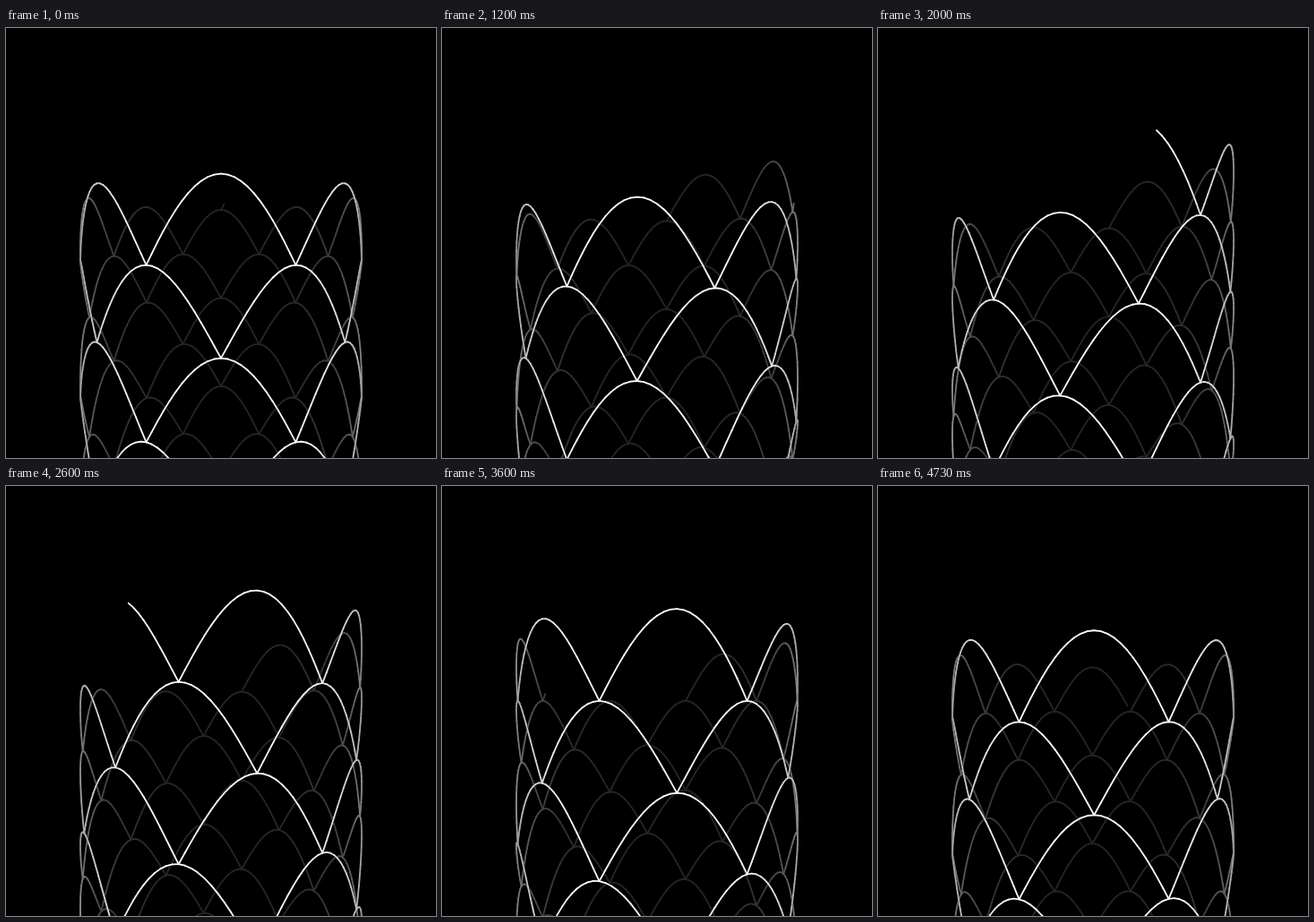
An HTML page with a canvas for the animation above (4790 ms loop, 480 by 480 pixels).

```html
<!DOCTYPE html>
<html lang="en">
<head>
<meta charset="utf-8">
<title>Woven cylinder</title>
<style>
  html, body { margin: 0; width: 100%; height: 100%; overflow: hidden; background: #000; }
  canvas { display: block; }
</style>
</head>
<body>
<canvas id="stage" width="480" height="480"></canvas>
<script>
const ctx = document.getElementById('stage').getContext('2d');
const SIZE = 480, CENTER = SIZE / 2;
const LOOP = 4790, FRAMES = 72, STEP = 200 / 3;
const CAMERA = CENTER / Math.tan(Math.PI / 6);
const RADIUS = 146.9, PITCH = 66.6, TOP = -50;
const ARCHES = 8, ARCH_STEPS = 24, RINGS = 8;
const TOTAL = ARCHES * ARCH_STEPS;
const HALF_ARCH = Math.PI / ARCHES;

// Frame starts fall on whole hundredths of a second.
const frameStart = i => Math.round(i * STEP / 10) * 10;

function frameAt(ms) {
  let i = Math.min(FRAMES - 1, Math.ceil(ms / STEP) + 1);
  while (frameStart(i) > ms) i--;
  return i;
}

function project(angle, height) {
  const scale = CAMERA / (CAMERA - RADIUS * Math.cos(angle));
  return [CENTER + RADIUS * Math.sin(angle) * scale, CENTER + height * scale];
}

function shade(angle) {
  const nearness = (1 + Math.cos(angle)) / 2;
  const gray = Math.min(255, Math.round(36 + 235 * nearness ** 2));
  return `rgb(${gray},${gray},${gray})`;
}

function drawRing(start, base, count) {
  const angleAt = i => start - 2 * Math.PI * i / TOTAL;
  const pointAt = i => project(angleAt(i),
    base - PITCH * Math.abs(Math.sin(Math.PI * i / ARCH_STEPS)));
  let from = pointAt(0);
  for (let i = 1; i <= count; i++) {
    const to = pointAt(i);
    ctx.strokeStyle = shade(angleAt(i - 0.5));
    ctx.beginPath();
    ctx.moveTo(...from);
    ctx.lineTo(...to);
    ctx.stroke();
    from = to;
  }
}

function draw(ms) {
  const frame = frameAt(ms);
  const progress = frame / FRAMES;
  const drawn = Math.min(TOTAL, Math.ceil(frame * TOTAL / FRAMES - 1e-6) + 1);

  ctx.globalCompositeOperation = 'source-over';
  ctx.fillStyle = '#000';
  ctx.fillRect(0, 0, SIZE, SIZE);

  // Lightest wins, so near strands stay unbroken over far ones.
  ctx.globalCompositeOperation = 'lighten';
  ctx.lineWidth = 1.8;
  ctx.lineCap = 'round';
  for (let ring = 0; ring < RINGS; ring++) {
    const age = ring + progress;
    drawRing(Math.PI - HALF_ARCH * age, TOP + PITCH * age, ring ? TOTAL : drawn);
  }
}

const began = performance.now();
function tick() {
  draw((performance.now() - began) % LOOP);
  requestAnimationFrame(tick);
}
tick();
</script>
</body>
</html>
```
